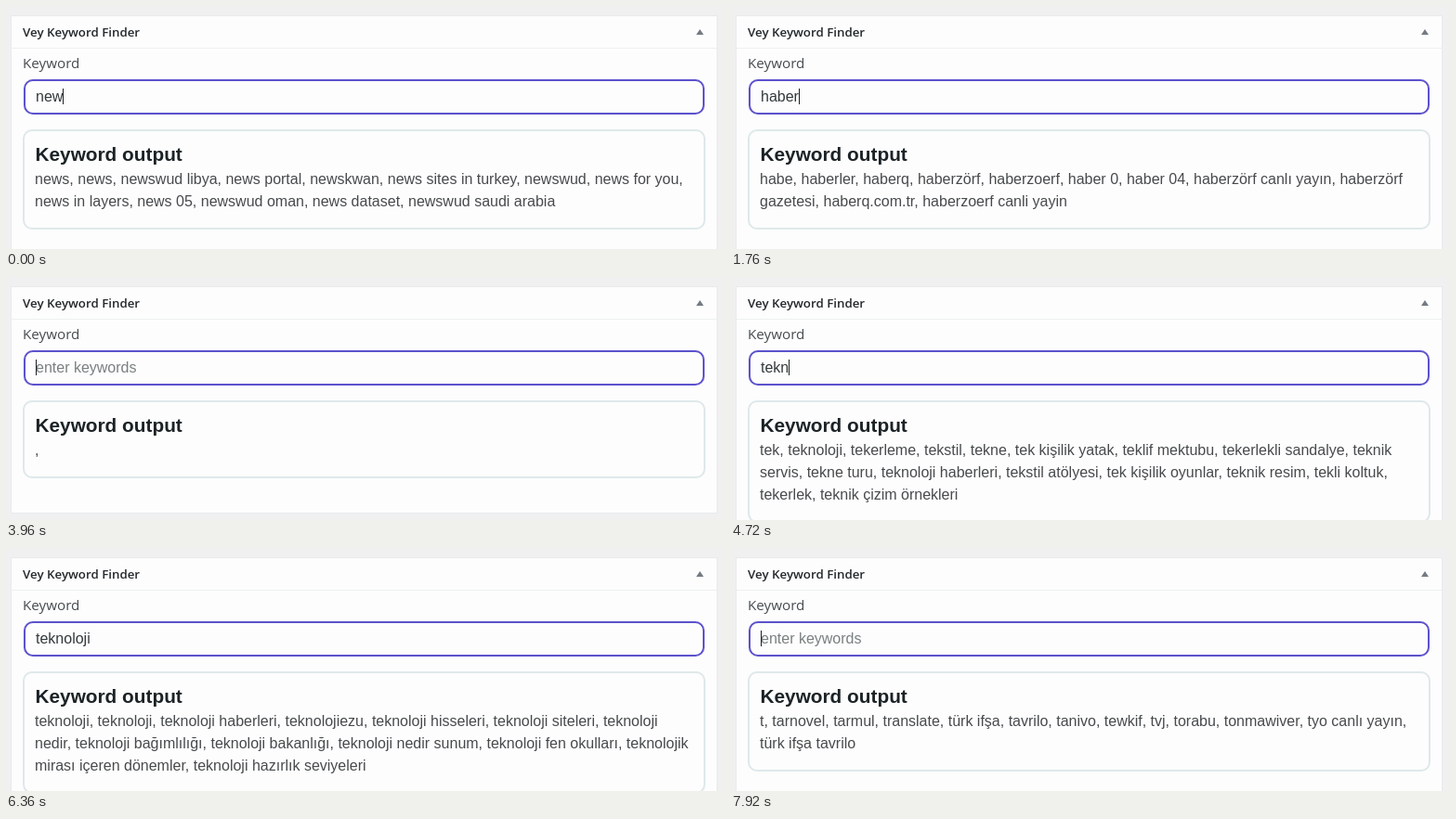
An HTML page that plays this animation: 774 by 262 pixels, repeating every 8000 ms.

```html
<!DOCTYPE html>
<html lang="tr">
<head>
<meta charset="utf-8">
<title>Keyword Finder</title>
<style>
  html, body { margin: 0; width: 100%; height: 100%; overflow: hidden; background: #f0f0f1; }
  #stage { position: relative; width: 774px; height: 262px; overflow: hidden; background: #f0f0f1;
    font: 16px/24px "Liberation Sans", Arial, sans-serif; color: #474a4c; }
  #stage * { position: absolute; box-sizing: border-box; white-space: nowrap; }
  #panel { left: 5px; top: 10px; width: 761px; background: #fdfdfd; border: 1px solid #e9eaec; }
  #rule { left: 6px; top: 45px; width: 759px; height: 1px; background: #eeeff1; }
  #title, #label { left: 18px; line-height: 20px; font-family: "Open Sans", "Noto Sans", sans-serif; }
  #title { top: 18px; font-size: 13.3px; font-weight: 600; color: #23282c; }
  #label { top: 51px; font-size: 15.2px; color: #474c50; }
  #arrow { left: 743px; top: 25px; border: solid transparent; border-width: 0 4.5px 6px; border-bottom-color: #757b84; }
  #field { left: 19px; top: 79px; width: 733px; height: 38px; border: 2px solid #5c52cc; border-radius: 10px;
    box-shadow: 0 0 1px #b4b0ea; }
  #typed, #hint { left: 32px; top: 86px; white-space: pre; }
  #typed { min-height: 24px; color: #33383a; }
  #hint { color: #7a7f80; }
  #caret { left: 100%; top: 3px; width: 1px; height: 17px; background: #1c2022; }
  #card { left: 18px; top: 133px; width: 735px; border: 2px solid #dfe8ea; border-radius: 10px; }
  #head { left: 31.5px; top: 148px; font-size: 20.8px; font-weight: bold; color: #1c2326; }
  #stage #out { left: 31px; top: 175px; width: 711px; white-space: normal; }
</style>
</head>
<body>
<div id="stage">
  <div id="panel"></div>
  <div id="rule"></div>
  <div id="title">Vey Keyword Finder</div>
  <div id="arrow"></div>
  <div id="label">Keyword</div>
  <div id="field"></div>
  <div id="hint">enter keywords</div>
  <div id="typed"><span id="text" style="position:static"></span><i id="caret"></i></div>
  <div id="card"></div>
  <div id="head">Keyword output</div>
  <div id="out"></div>
</div>
<script>
const LOOP = 8000, BLINK = 500;
const $ = id => document.getElementById(id);

// Suggestions by query prefix; the longest matching prefix wins.
const suggestions = {
  n: "nedir, namaz vakitleri, nöbetçi eczane, news, nasıl yapılır, navigasyon, nüfus, nevresim takımı, nar ekşisi, noter, not hesaplama",
  ne: "nedir, ne demek, nerede, neden, ne zaman, nefes, nevresim takımı, nem, nergis, ne yemek yapsam, nehir, netice, neşe, nesne",
  new: "news, newswud libya, news portal, newskwan, news sites in turkey, newswud, news for you, news in layers, news 05, newswud oman, news dataset, newswud saudi arabia",
  h: "haber, hava durumu, hesap makinesi, harita, haberler, hisse senedi, hikaye, hava, hastane randevu, halı, hukuk, hayvanlar, havuz",
  ha: "haber, hava durumu, haberler, harita, hava, hastane randevu, halı, hayvanlar, havuz, hafta sonu hava durumu, hamsi, hayat, hamur tarifi",
  hab: "haberler, haberq, haberzörf, haberzoerf, haber 0, haber 04, haberzörf canlı yayın, haberzörf gazetesi, haberq.com.tr, haberzoerf canli yayin",
  t: "tarnovel, tarmul, translate, türk ifşa, tavrilo, tanivo, tewkif, tvj, torabu, tonmawiver, tyo canlı yayın, türk ifşa tavrilo",
  tek: "teknoloji, tekerleme, tekstil, tekne, tek kişilik yatak, teklif mektubu, tekerlekli sandalye, teknik servis, tekne turu, teknoloji haberleri, tekstil atölyesi, tek kişilik oyunlar, teknik resim, tekli koltuk, tekerlek, teknik çizim örnekleri",
  tekn: "teknoloji, tekne, teknik servis, teknik resim, tekne turu, teknoloji haberleri, teknik çizim, teknik lise, tekne kiralama, teknoloji siteleri, teknik direktör, teknik şartname, teknoloji nedir, teknik analiz, tekne orucu, teknik bilimler",
  tekno: "teknoloji, teknoloji haberleri, teknoloji siteleri, teknolojiezu, teknoloji hisseleri, teknokent, teknoloji nedir, teknoloji bağımlılığı, teknoloji bakanlığı, teknopark, teknoloji nedir sunum, teknoloji fen okulları, teknoloji tasarım",
  teknol: "teknoloji, teknoloji haberleri, teknolojiezu, teknoloji hisseleri, teknoloji siteleri, teknoloji nedir, teknoloji bağımlılığı, teknoloji bakanlığı, teknoloji nedir sunum, teknoloji fen okulları, teknolojik mirası içeren dönemler, teknoloji hazırlık seviyeleri"
};

function output(query) {
  let prefix = query;
  while (prefix && !suggestions[prefix]) prefix = prefix.slice(0, -1);
  return query + ", " + (suggestions[prefix] || "");
}

// Each step is "time:value"; answers arrive a little after the keys.
const track = s => s.split(" ").map(p => {
  const [time, value] = p.split(":");
  return { time: +time, value };
});
const keys = track("0:new 200:ne 360:n 520: 1200:h 1320:ha 1480:hab 1580:habe 1700:haber " +
  "1960:habe 2120:hab 2920:ha 3080:h 3540: 4280:t 4440:tek 4640:tekn 4760:tekno 4960:teknol " +
  "5160:teknolo 5360:teknoloj 5640:teknoloji 6920:teknoloj 7040:teknolo 7160:teknol 7280:tekno " +
  "7400:tekn 7520:tek 7640:t 7800:");
const answers = track("0:news 120:new 360:ne 560:n 760: 1480:h 1560:ha 1640:hab 1740:habe " +
  "1880:haber 2240:habe 2960:hab 3240:ha 3360:h 3800: 4600:t 4720:tek 4840:tekn 5000:tekno " +
  "5120:teknol 5320:teknolo 5480:teknoloj 5800:teknoloji 7000:teknoloj 7120:teknolo 7240:teknol " +
  "7360:tekno 7520:tekn 7680:tek 7840:t");

const stepAt = (steps, t) => steps.filter(s => s.time <= t).pop();

let shown = null;
function showAnswer(query) {
  if (query === shown) return;
  shown = query;
  $("out").textContent = output(query);
  const bottom = 175 + $("out").offsetHeight + 18;
  $("card").style.height = bottom - 133 + "px";
  $("panel").style.height = bottom + 38 - 10 + "px";
}

function draw(now) {
  const t = now % LOOP;
  const key = stepAt(keys, t);
  $("text").textContent = key.value;
  $("hint").hidden = key.value !== "";
  $("caret").hidden = Math.floor((t - key.time) / BLINK) % 2 === 1;
  showAnswer(stepAt(answers, t).value);
}

const start = performance.now();
function tick() {
  draw(performance.now() - start);
  requestAnimationFrame(tick);
}
tick();
</script>
</body>
</html>
```
